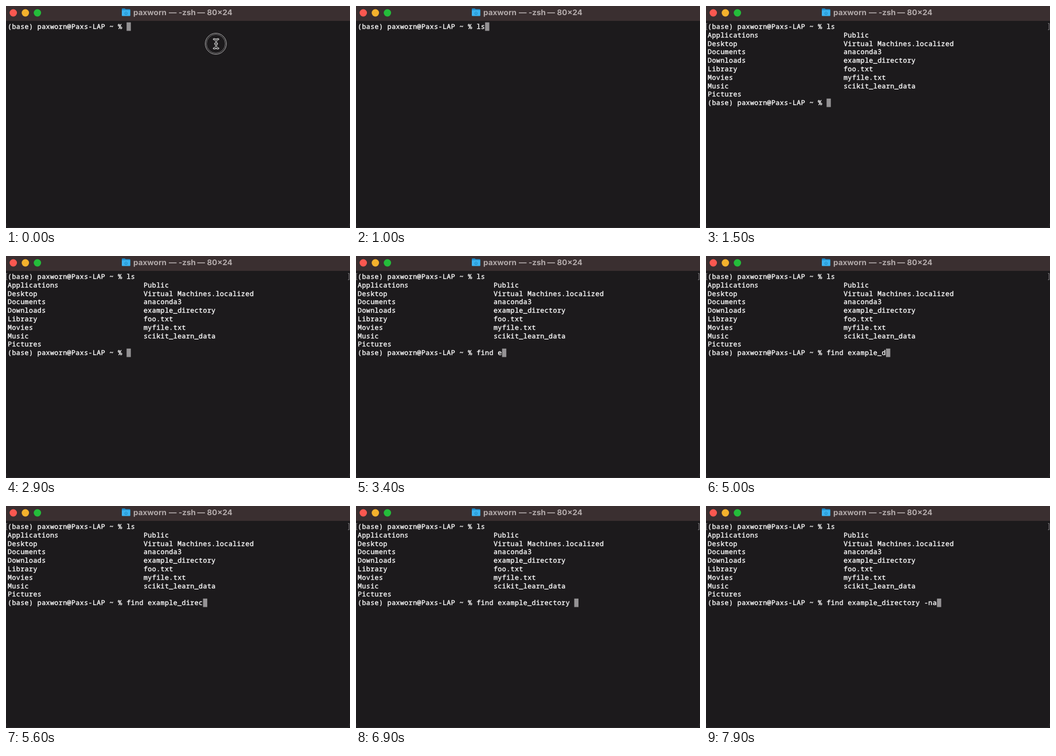
An HTML page that plays this animation: 600 by 388 pixels, repeating every 8 s.

```html
<!DOCTYPE html>
<html lang="en">
<head>
<meta charset="utf-8">
<title>Terminal</title>
<style>
  html, body { margin: 0; width: 100%; height: 100%; overflow: hidden; background: #1c1a1c; }
  svg { display: block; width: 600px; height: 388px; }
  text { white-space: pre; text-rendering: geometricPrecision; }
  #rows text {
    font: 500 11.7px "Noto Sans Mono", "DejaVu Sans Mono", monospace; letter-spacing: .385px;
    fill: #fff; stroke: #fff; stroke-width: .35px;
  }
  #title text { font: 700 13.5px Inter, Roboto, sans-serif; fill: #b3abab; }
</style>
</head>
<body>
<svg viewBox="0 0 600 388">
  <rect width="600" height="388" fill="#1c1a1c"/>
  <rect width="600" height="26" fill="#3a2f30"/>
  <path d="M.5 380Q.5 387.5 8 387.5H592Q599.5 387.5 599.5 380" fill="none" stroke="#2c2a2c"/>
  <circle cx="12.7" cy="12" r="6.4" fill="#fc5850"/>
  <circle cx="33.8" cy="12" r="6.4" fill="#f4b22d"/>
  <circle cx="54.8" cy="12" r="6.4" fill="#24bd3a"/>
  <path d="M202 5.6Q202 4.2 203.4 4.2H207.2L208.8 5.6H215.4Q216.8 5.6 216.8 7V9H202Z" fill="#1c8ccb"/>
  <rect x="202" y="7.2" width="14.8" height="10.4" rx="1.3" fill="#3bb3f0"/>
  <path d="M206.9 12.4L209.4 10.2L211.9 12.4M207.7 12V14.8H211.1V12" fill="none" stroke="#1c84bd" stroke-width=".9"/>
  <g id="title">
    <text x="222" y="16.4">paxworn</text>
    <text x="284" y="16.4">—</text>
    <text x="301" y="16.4">-zsh</text>
    <text x="333.5" y="16.4">—</text>
    <text x="350.5" y="16.4">80×24</text>
  </g>
  <rect id="block" width="7.4" height="14.8" fill="#949294"/>
  <g id="rows"></g>
  <path id="marks" d="M2.4 30.5H.6V41.5H2.4M596.6 30.5H598.4V41.5H596.6" fill="none" stroke="#8a888a"/>
  <g id="mouse" fill="none" transform="translate(366 66)">
    <g id="ring" stroke="#fff">
      <circle r="18.4" stroke-width=".8" opacity=".8"/>
      <circle r="16.4" stroke-width=".7" opacity=".55"/>
    </g>
    <defs>
      <path id="beam" d="M-3.4 -8Q0 -8 .4 -5.4Q.8 -8 4.2 -8M.4 -5.4V5.4M-3.4 8Q0 8 .4 5.4Q.8 8 4.2 8M-1.2 0H2"
        stroke-linecap="round" stroke-linejoin="round"/>
    </defs>
    <use href="#beam" stroke="#fff" stroke-width="3"/>
    <use href="#beam" stroke="#111" stroke-width="1.2"/>
  </g>
</svg>
<script>
const LOOP = 8000, LEFT = 3, COL = 7.405, ROW = 14.8, BASE = 40;
const PROMPT = "(base) paxworn@Paxs-LAP ~ % ";
const ENTER = 1200, FIRST_KEY = 700;
const LIST_KEYS = [FIRST_KEY, 900];
const FIND = "find example_directory -na";
const FIND_KEYS = [3000, 3100, 3100, 3200, 3300, 3400, 3600, 3700, 3900, 4100, 4400, 4500, 4700,
  4900, 5100, 5300, 5500, 5600, 5700, 5900, 6100, 6300, 6600, 7200, 7700, 7900];
const FILES = [
  ["Applications", "Public"],
  ["Desktop", "Virtual Machines.localized"],
  ["Documents", "anaconda3"],
  ["Downloads", "example_directory"],
  ["Library", "foo.txt"],
  ["Movies", "myfile.txt"],
  ["Music", "scikit_learn_data"],
  ["Pictures", ""]
];
const LAST = FILES.length + 1;

const el = id => document.getElementById(id);
const make = name => document.createElementNS("http://www.w3.org/2000/svg", name);
const show = (node, on) => node.setAttribute("visibility", on ? "visible" : "hidden");
const typed = (text, keys, t) => text.slice(0, keys.filter(k => k <= t).length);

function addText(parent, row, col, str) {
  const node = make("text");
  node.setAttribute("x", LEFT + col * COL);
  node.setAttribute("y", BASE + row * ROW);
  node.textContent = str;
  return parent.appendChild(node);
}

const rows = el("rows");
const listing = rows.appendChild(make("g"));
addText(rows, 0, 0, PROMPT);
const listCmd = addText(rows, 0, PROMPT.length, "");
FILES.forEach(([a, b], i) => {
  addText(listing, i + 1, 0, a);
  addText(listing, i + 1, 32, b);
});
addText(listing, LAST, 0, PROMPT);
const findCmd = addText(listing, LAST, PROMPT.length, "");

function draw(t) {
  const done = t >= ENTER;
  const ls = typed("ls", LIST_KEYS, t);
  const find = typed(FIND, FIND_KEYS, t);
  listCmd.textContent = ls;
  findCmd.textContent = find;
  show(listing, done);
  show(el("marks"), done);

  const col = PROMPT.length + (done ? find : ls).length;
  el("block").setAttribute("x", LEFT + col * COL);
  el("block").setAttribute("y", 28.6 + (done ? LAST : 0) * ROW);

  // The click ring fades; the pointer hides on the first key.
  show(el("mouse"), t < FIRST_KEY);
  el("ring").setAttribute("opacity", Math.max(0, Math.min(1, (500 - t) / 400)));
}

const start = performance.now();
function tick() {
  draw((performance.now() - start) % LOOP);
  requestAnimationFrame(tick);
}
draw(0);
requestAnimationFrame(tick);
</script>
</body>
</html>
```
